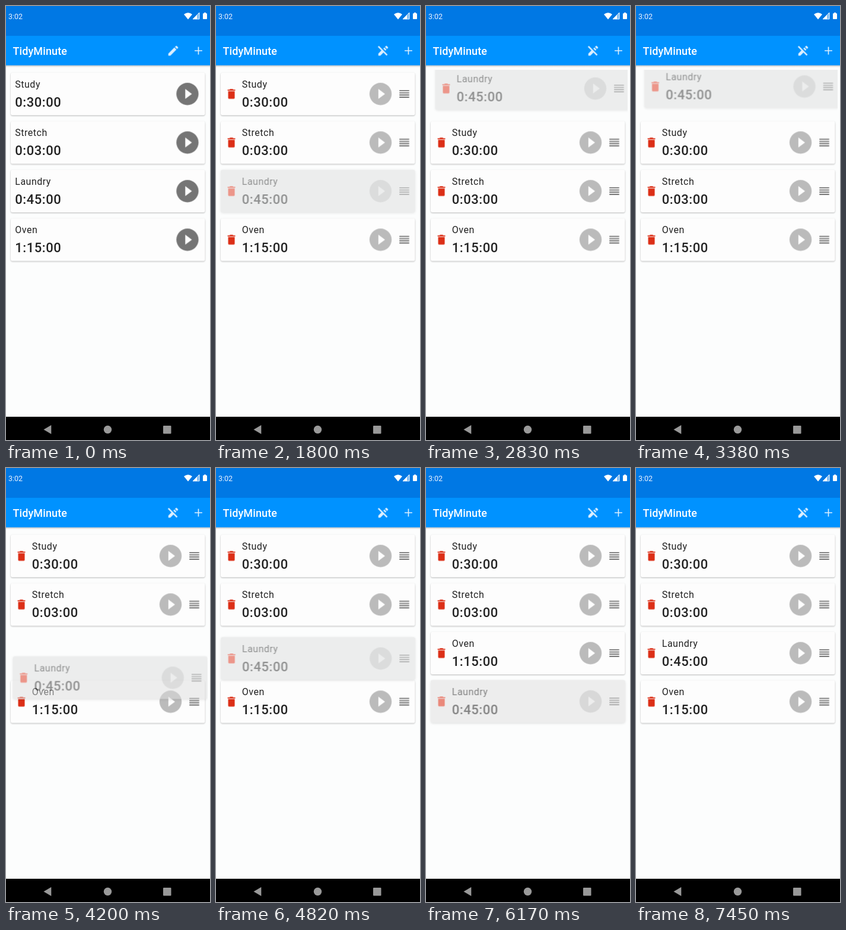
These frames come from a looping animation (344x728 px, 7780 ms). An HTML page:

```html
<!DOCTYPE html>
<html lang="en">
<head>
<meta charset="utf-8">
<title>TidyMinute</title>
<style>
  html, body { margin: 0; width: 100%; height: 100%; overflow: hidden; background: #fcfdfd; }
  svg { display: block; width: 344px; height: 728px; font-family: Roboto, sans-serif; }
  .title { font-size: 18px; font-weight: 500; letter-spacing: .1px; fill: #fff; }
  .clock { font-size: 12.5px; fill: #e8f3ff; }
  .name { font-size: 16px; letter-spacing: .5px; fill: #222; }
  .time { font-size: 22px; font-weight: 500; letter-spacing: .55px; fill: #222; }
  .panel { fill: #fdfdfd; filter: drop-shadow(0 1px 1px rgba(0, 0, 0, .28)); }
  .bin { fill: #dc2f17; }
  .grip { fill: #757575; }
  .play { fill: #757575; fill-rule: evenodd; }
  .bar { fill: #dcefff; }
</style>
</head>
<body>
<svg viewBox="0 0 344 728">
  <defs>
    <clipPath id="listClip"><rect x="4" y="107" width="336" height="580"/></clipPath>
    <linearGradient id="shade" x2="0" y2="1">
      <stop stop-color="#000" stop-opacity=".24"/>
      <stop offset="1" stop-color="#000" stop-opacity="0"/>
    </linearGradient>
  </defs>
  <rect width="344" height="728" fill="#fcfdfd"/>
  <g id="list" clip-path="url(#listClip)"></g>

  <rect y="99" width="344" height="4" fill="url(#shade)"/>
  <rect y="50" width="344" height="49.5" fill="#0092ff"/>
  <rect width="344" height="50" fill="#0078e4"/>
  <text class="clock" x="4" y="21.5">3:02</text>
  <g fill="#fff">
    <path d="M300 14Q307 8.500 314 14L307 22.500Z"/>
    <path d="M326 11V22H315Z" opacity=".4"/>
    <path d="M322.500 14.500V22H315ZM325.200 11.800H326V22H325.200Z"/>
    <path d="M315 22L326 11V22Z" fill="none" stroke="#fff" stroke-width=".8"/>
    <path d="M334 11h3v1.300h1.200q.8 0 .8.800v8q0 .9-.8.900h-5.400q-.8 0-.8-.900v-8q0-.8.800-.800h1.200Z"/>
  </g>
  <text class="title" x="11.500" y="82">TidyMinute</text>
  <g class="bar" id="actions"></g>

  <rect y="689" width="344" height="39" fill="#000"/>
  <g fill="#999">
    <path d="M63.500 710.500L76.300 703V718Z"/>
    <circle cx="171.500" cy="710.500" r="6.700"/>
    <rect x="265" y="704" width="13.500" height="13.500" rx="1"/>
  </g>
</svg>
<script>
const LOOP = 7780, PITCH = 81.5, INDENT = 28.5;
const icons = {
  pencil: 'M3 17.250V21h3.750L17.810 9.940l-3.750-3.750zM20.710 7.040c.39-.39.39-1.020 0-1.410l-2.340-2.340c-.39-.39-1.020-.39-1.410 0l-1.830 1.830 3.750 3.750z',
  pencilOff: 'M12.126 8.125l1.937-1.937 3.747 3.747-1.937 1.938zM20.710 5.630l-2.340-2.340a1 1 0 0 0-1.410 0l-1.830 1.830 3.750 3.750L20.710 7a1 1 0 0 0 0-1.370zM2 5l6.630 6.630L3 17.250V21h3.750l5.630-5.620L18 21l2-2L4 3z',
  plus: 'M19 12.900h-6.100V19h-1.800v-6.100H5v-1.800h6.100V5h1.800v6.100H19z',
  bin: 'M6 19c0 1.100.9 2 2 2h8c1.100 0 2-.9 2-2V7H6zM19 4h-3.500l-1-1h-5l-1 1H5v2h14z',
  grip: 'M3 15h18v-2H3zm0 4h18v-2H3zm0-8h18V9H3zm0-6v2h18V5H3z',
  play: 'M12 2a10 10 0 1 0 0 20 10 10 0 1 0 0-20zM10 16.500v-9l6 4.500z'
};

function add(parent, tag, attrs = {}, text = '') {
  const el = document.createElementNS('http://www.w3.org/2000/svg', tag);
  for (const key in attrs) el.setAttribute(key, attrs[key]);
  el.textContent = text;
  return parent.appendChild(el);
}

// A 24-unit icon centred on (x, y); the returned wrapper is free to be animated.
function icon(parent, name, x, y, scale = .92) {
  const wrap = add(parent, 'g', { class: name });
  add(wrap, 'path', { d: icons[name], transform: `translate(${x} ${y}) scale(${scale}) translate(-12 -12)` });
  return wrap;
}

// steps: [ms, style, easing to the next step]
function track(el, steps) {
  const all = [[0, steps[0][1]], ...steps, [LOOP, steps.at(-1)[1]]];
  el.animate(all.map(([ms, style, easing = 'linear']) => ({ offset: ms / LOOP, easing, ...style })),
    { duration: LOOP, iterations: Infinity });
}

const at = (x, y = 0) => ({ transform: `translate(${x}px, ${y}px)` });
const move = (el, points) => track(el, points.map(([ms, x, y, ease]) => [ms, at(x, y), ease]));
const slide = (el, from, to) => track(el, [[920, from, 'ease-out'], [1290, to]]);

function card(name, time, slot) {
  const slotGroup = add(list, 'g', { transform: `translate(0 ${slot * PITCH})` });
  const body = add(slotGroup, 'g');
  const panel = add(body, 'rect', { class: 'panel', x: 8, y: 111.7, width: 327.5, height: 71.5, rx: 3 });
  const label = add(body, 'g');
  add(label, 'text', { class: 'name', x: 15.3, y: 136.5 }, name);
  add(label, 'text', { class: 'time', x: 15.3, y: 168.8 }, time);
  slide(label, at(0), at(INDENT));
  slide(icon(body, 'play', 306, 147.5, 1.87), { ...at(0), fill: '#757575' }, { ...at(-INDENT), fill: '#bbbbbb' });
  slide(icon(body, 'bin', 26, 147.5), { ...at(-INDENT), opacity: 0 }, { ...at(0), opacity: 1 });
  slide(icon(body, 'grip', 317.5, 147.5), { ...at(INDENT), opacity: 0 }, { ...at(0), opacity: 1 });
  return { body, panel };
}

const list = document.getElementById('list');
const actions = document.getElementById('actions');

const pencil = icon(actions, 'pencil', 282, 75);
const pencilOff = icon(actions, 'pencilOff', 282, 75);
icon(actions, 'plus', 324.5, 75);
track(pencil, [[940, { opacity: 1 }, 'step-end'], [941, { opacity: 0 }]]);
track(pencilOff, [[940, { opacity: 0 }, 'step-end'], [941, { opacity: 1 }]]);

const study = card('Study', '0:30:00', 0);
const stretch = card('Stretch', '0:03:00', 1);
const oven = card('Oven', '1:15:00', 3);
const laundry = card('Laundry', '0:45:00', 2);

// Neighbours step aside for the dragged card, then return.
const stepAside = (el, shift, leave, back) => move(el, [
  [leave, 0, 0, 'ease-in-out'], [leave + 210, 0, shift],
  [back, 0, shift, 'ease-in-out'], [back + 210, 0, 0]
]);
stepAside(stretch.body, PITCH, 2098, 3920);
stepAside(study.body, PITCH, 2380, 3750);
stepAside(oven.body, -PITCH, 5020, 6300);

move(laundry.body, [
  [1800, 0, 0, 'ease-in'], [2210, 10.5, -109], [2265, 10.5, -109],
  [2460, 10, -158, 'ease-out'], [2800, 8, -172], [3380, 6.5, -175.5],
  [3580, 6.5, -175.5, 'cubic-bezier(.4, 0, .6, 1)'], [4200, 3.7, 41.3], [4260, 3.7, 41.3, 'ease-out'], [4400, 0, 0],
  [4650, 0, 0, 'ease-in-out'], [5350, 2, 73], [5430, 2, 75],
  [5490, 2, 75, 'ease-in-out'], [5830, 0, PITCH],
  [6150, 0, PITCH, 'ease-in-out'], [6520, 3, 5, 'ease-out'], [6680, 0, 0]
]);

const held = [[1730, 1790, 4330, 4480], [4620, 4690, 5820, 5970], [6110, 6180, 6610, 6710]];
const lift = (el, rest, raised) => track(el, held.flatMap(([grab, up, drop, down]) =>
  [[grab, rest], [up, raised], [drop, raised], [down, rest]]));
lift(laundry.body, { opacity: 1 }, { opacity: .5 });
lift(laundry.panel,
  { fill: '#fdfdfd', filter: 'drop-shadow(0 1px 1px rgba(0, 0, 0, .28))' },
  { fill: '#dddddd', filter: 'drop-shadow(0 1px 2px rgba(0, 0, 0, .2))' });
</script>
</body>
</html>
```
